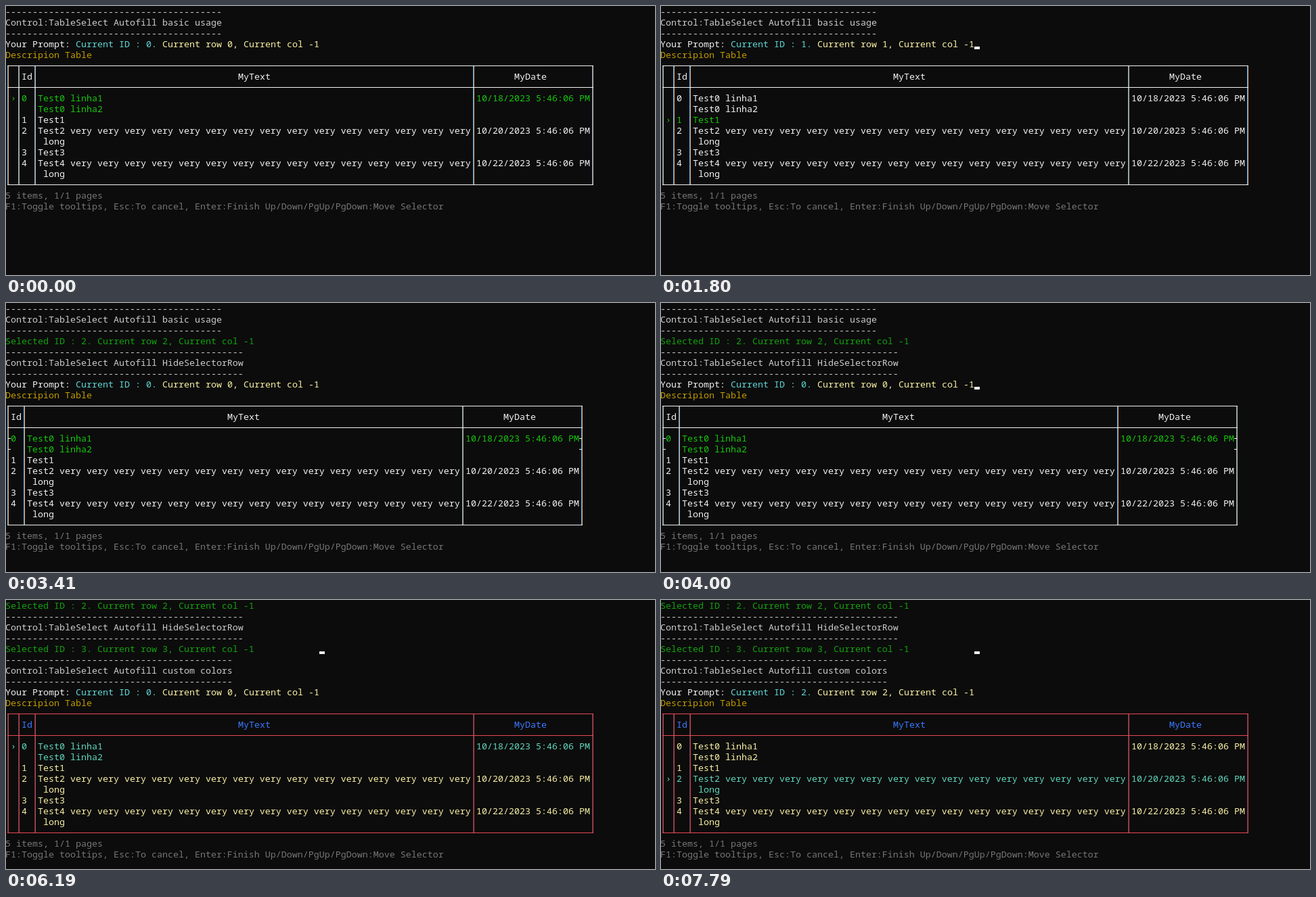
Animation of 959x398 px, one loop 7990 ms. Source, as an HTML page with a canvas:

```html
<!DOCTYPE html>
<html lang="en">
<head>
<meta charset="utf-8">
<title>Console table select</title>
<style>
  html, body { margin: 0; width: 100%; height: 100%; overflow: hidden; background: #0c0c0c; }
  canvas { display: block; }
</style>
</head>
<body>
<canvas id="screen" width="959" height="398"></canvas>
<script>
const ctx = document.getElementById('screen').getContext('2d');
const CELL_W = 8, CELL_H = 16, LOOP = 7990, CURSOR_COL = 58;
const GRAY = '#cccccc', WHITE = '#f2f2f2', DIM = '#767676', GOLD = '#c19c00',
      CYAN = '#61d6d6', CREAM = '#f9f1a5', GREEN = '#16c60c', DARK_GREEN = '#13a10e';

const veryLong = id => [`Test${id}` + ' very'.repeat(15), ' long'];
const items = [
  { lines: ['Test0 linha1', 'Test0 linha2'], date: '10/18/2023 5:46:06 PM' },
  { lines: ['Test1'] },
  { lines: veryLong(2), date: '10/20/2023 5:46:06 PM' },
  { lines: ['Test3'] },
  { lines: veryLong(4), date: '10/22/2023 5:46:06 PM' },
];

// Upright lines are two pixels wide, with a colour fringe on each side.
const plain = { line: WHITE, fringe: ['#55aeee', '#dca062'], head: WHITE, text: WHITE, selected: GREEN };
const colored = { line: '#e74856', fringe: ['#5c3a5a', '#c8403a'], head: '#3b78ff', text: CREAM, selected: '#61d6bc' };
const withArrow = { edges: [0, 2, 5, 86, 108], arrow: true };
const withTicks = { edges: [0, 3, 84, 106], arrow: false };

// Each scene starts its prompt at `top`; `log` draws what was printed above it.
const scenes = {
  basic: { top: 3, layout: withArrow, theme: plain, log() { title(0, 'basic usage'); } },
  cleared: {
    log() {
      title(0, 'basic usage');
      result(3, 2);
      title(4, 'HideSelectorRow');
    },
  },
  hidden: { top: 7, layout: withTicks, theme: plain, log() { scenes.cleared.log(); } },
  custom: {
    top: 8, layout: withArrow, theme: colored,
    log() {
      result(0, 2);
      title(1, 'HideSelectorRow');
      result(4, 3);
      title(5, 'custom colors');
      cursor(4);
    },
  },
};

// [start ms, scene, selected item, cursor shown]
const timeline = [
  [0, 'basic', 0, false], [210, 'basic', 0, true], [810, 'basic', 0, false],
  [1200, 'basic', 0, true], [1400, 'basic', 1, false], [1800, 'basic', 1, true],
  [2400, 'basic', 2, false], [2590, 'cleared'],
  [2990, 'hidden', 0, true], [3410, 'hidden', 0, false], [3800, 'hidden', 0, true],
  [4200, 'hidden', 1, false], [4600, 'hidden', 1, true],
  [4990, 'hidden', 2, false], [5590, 'hidden', 3, true],
  [6190, 'custom', 0, false], [6580, 'custom', 0, true], [7200, 'custom', 0, false],
  [7400, 'custom', 1, false], [7790, 'custom', 2, false],
];

const colX = col => col * CELL_W - 1;
const midX = col => colX(col) + 4;
const midY = row => row * CELL_H + 8;

function print(col, row, text, color) {
  ctx.fillStyle = color;
  ctx.fillText(text, colX(col), row * CELL_H + 13);
}

function rect(x, y, w, h, color) {
  ctx.fillStyle = color;
  ctx.fillRect(x, y, w, h);
}

function cursor(row) {
  rect(colX(CURSOR_COL), row * CELL_H + 12, CELL_W, 4, WHITE);
}

function title(row, name) {
  const text = 'Control:TableSelect Autofill ' + name;
  const dashes = '-'.repeat(text.length);
  [dashes, text, dashes].forEach((line, i) => print(0, row + i, line, GRAY));
}

function result(row, id) {
  print(0, row, `Selected ID : ${id}. Current row ${id}, Current col -1`, DARK_GREEN);
}

function drawTable(top, { edges, arrow }, theme, selected) {
  const [idEdge, textEdge, dateEdge, lastEdge] = edges.slice(-4);
  const left = midX(0), right = midX(lastEdge);
  const center = (text, from, to) =>
    print(from + 1 + Math.floor((to - from - 1 - text.length) / 2), top + 1, text, theme.head);

  for (const edge of edges) {
    theme.fringe.forEach((color, i) => rect(midX(edge) - 1 + i, midY(top), 1, 11 * CELL_H, color));
  }
  for (const row of [0, 2, 11]) rect(left - 1, midY(top + row), right - left + 2, 1, theme.line);
  center('Id', idEdge, textEdge);
  center('MyText', textEdge, dateEdge);
  center('MyDate', dateEdge, lastEdge);

  let row = top + 3;
  items.forEach(({ lines, date = '' }, id) => {
    const active = id === selected;
    const color = active ? theme.selected : theme.text;
    print(idEdge + 1, row, String(id), color);
    print(dateEdge + 1, row, date, color);
    if (active && arrow) print(1, row, '›', color);
    for (const line of lines) {
      print(textEdge + 1, row, line, color);
      if (active && !arrow) {
        rect(left, midY(row), 4, 1, theme.line);
        rect(right - 4, midY(row), 4, 1, theme.line);
      }
      row++;
    }
  });
}

function drawPrompt(top, id) {
  print(0, top, 'Your Prompt:', WHITE);
  print(13, top, `Current ID : ${id}.`, CYAN);
  print(29, top, `Current row ${id}, Current col -1`, CREAM);
  print(0, top + 1, 'Descripion Table', GOLD);
}

function drawFooter(row) {
  print(0, row, '5 items, 1/1 pages', DIM);
  print(0, row + 1, 'F1:Toggle tooltips, Esc:To cancel, Enter:Finish Up/Down/PgUp/PgDown:Move Selector', DIM);
}

function draw(now) {
  const time = now % LOOP;
  const [, name, selected, cursorOn] = timeline.findLast(([start]) => start <= time);
  const { top, layout, theme, log } = scenes[name];
  rect(0, 0, 959, 398, '#0c0c0c');
  ctx.font = '500 13.3333px "Noto Sans Mono", monospace';
  log();
  if (layout) {
    drawPrompt(top, selected);
    drawTable(top + 2, layout, theme, selected);
    drawFooter(top + 14);
    if (cursorOn) cursor(top);
  }
}

const origin = performance.now();
function tick() {
  draw(performance.now() - origin);
  requestAnimationFrame(tick);
}
tick();
</script>
</body>
</html>
```
